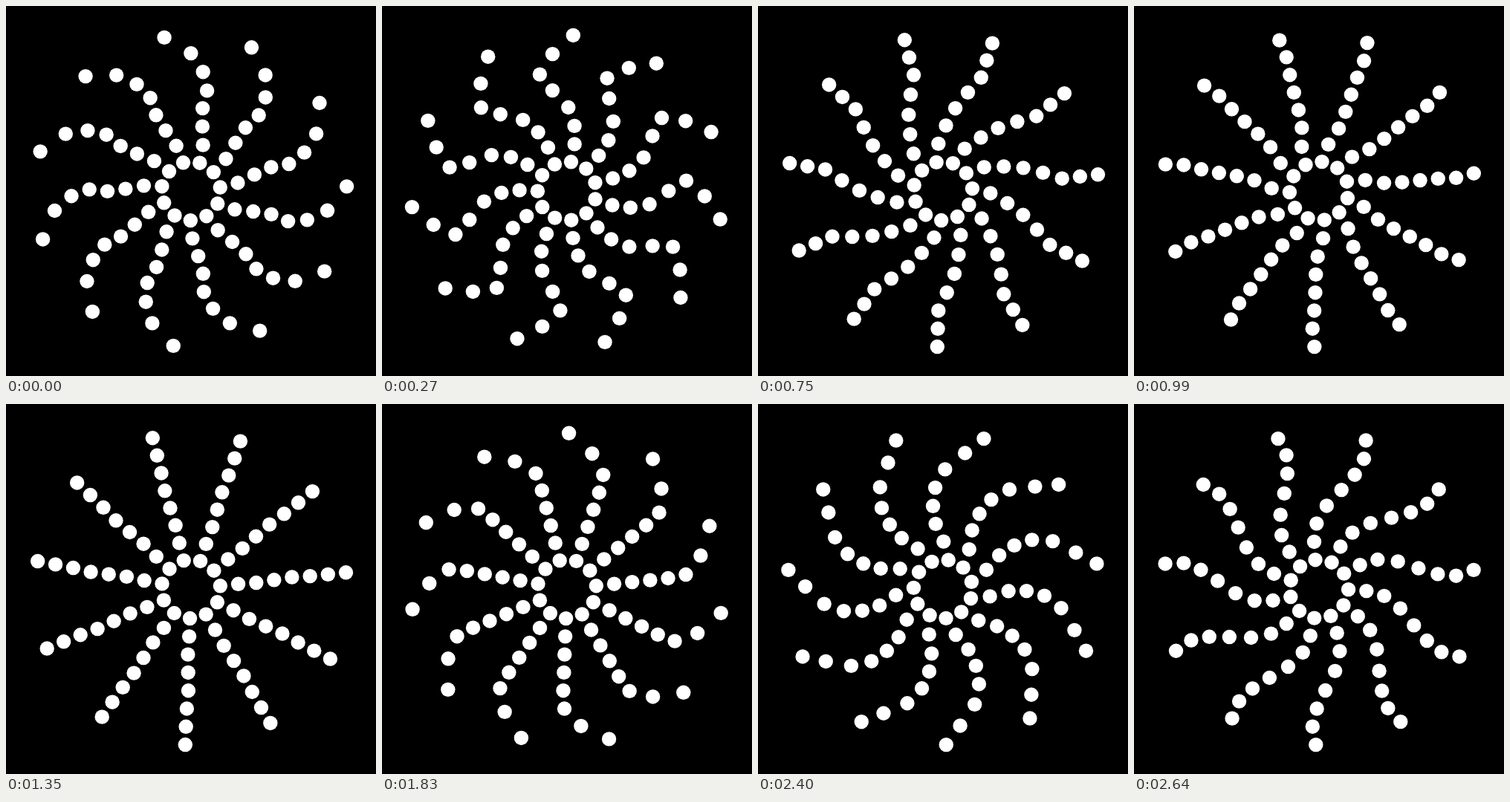
An HTML page with a canvas for the animation above (2670 ms loop, 498 by 498 pixels).

```html
<!DOCTYPE html>
<html lang="en">
<head>
<meta charset="utf-8">
<title>Dot wave</title>
<style>
  html, body { margin: 0; width: 100%; height: 100%; overflow: hidden; background: #000; }
  canvas { display: block; }
</style>
</head>
<body>
<canvas id="stage" width="498" height="498"></canvas>
<script>
const LOOP = 2670, STEP = 30, SIZE = 498;
const ARMS = 11, RINGS = 8;
const INNER = 39.6, GAP = 24.3, DOT = 9.7;
const LAG = 95; // each ring repeats its outer neighbour's turn this much later
const REST = 2.1;

// Key poses of the outermost ring: [ms, degrees clockwise].
// Two swings away from rest and back, each with a small wobble.
const keys = [
  [-670, 1], [-390, -8.4], [-300, -7.2], [-95, -16.4], [60, -29.8],
  [255, -15.1], [445, -3.5], [550, 2.2], [750, REST], [895, 2.7], [1030, 1.4],
  [1200, REST], [1600, REST], [1965, -23.6], [2160, -18.7], [2355, -3.6],
  [2535, 2.7], [2680, 0.8]
];

// Flat at turning points, otherwise the slope between the neighbours
const slopes = keys.map(([, y], i) => {
  const [x0, y0] = keys[i - 1] || keys[i];
  const [x1, y1] = keys[i + 1] || keys[i];
  return (y - y0) * (y1 - y) > 0 ? (y1 - y0) / (x1 - x0) : 0;
});

function angleAt(t) {
  const i = Math.max(1, keys.findIndex(([x]) => x >= t));
  const [x0, y0] = keys[i - 1], [x1, y1] = keys[i];
  const h = x1 - x0, u = (t - x0) / h, v = 1 - u;
  return v * v * ((1 + 2 * u) * y0 + u * h * slopes[i - 1])
       + u * u * ((1 + 2 * v) * y1 - v * h * slopes[i]);
}

const ctx = document.getElementById("stage").getContext("2d");

function dot(radius, angle) {
  ctx.beginPath();
  ctx.arc(SIZE / 2 + radius * Math.cos(angle), SIZE / 2 + radius * Math.sin(angle), DOT, 0, 2 * Math.PI);
  ctx.fill();
}

function draw(t) {
  ctx.fillStyle = "#000";
  ctx.fillRect(0, 0, SIZE, SIZE);
  ctx.fillStyle = "#fff";
  for (let ring = 0; ring < RINGS; ring++) {
    const turn = 90 + angleAt(t - LAG * (RINGS - 1 - ring));
    for (let arm = 0; arm < ARMS; arm++) {
      dot(INNER + GAP * ring, (turn + arm * 360 / ARMS) * Math.PI / 180);
    }
  }
}

const start = performance.now();
function tick() {
  const t = (performance.now() - start) % LOOP;
  draw(Math.floor(t / STEP) * STEP);
  requestAnimationFrame(tick);
}
tick();
</script>
</body>
</html>
```
